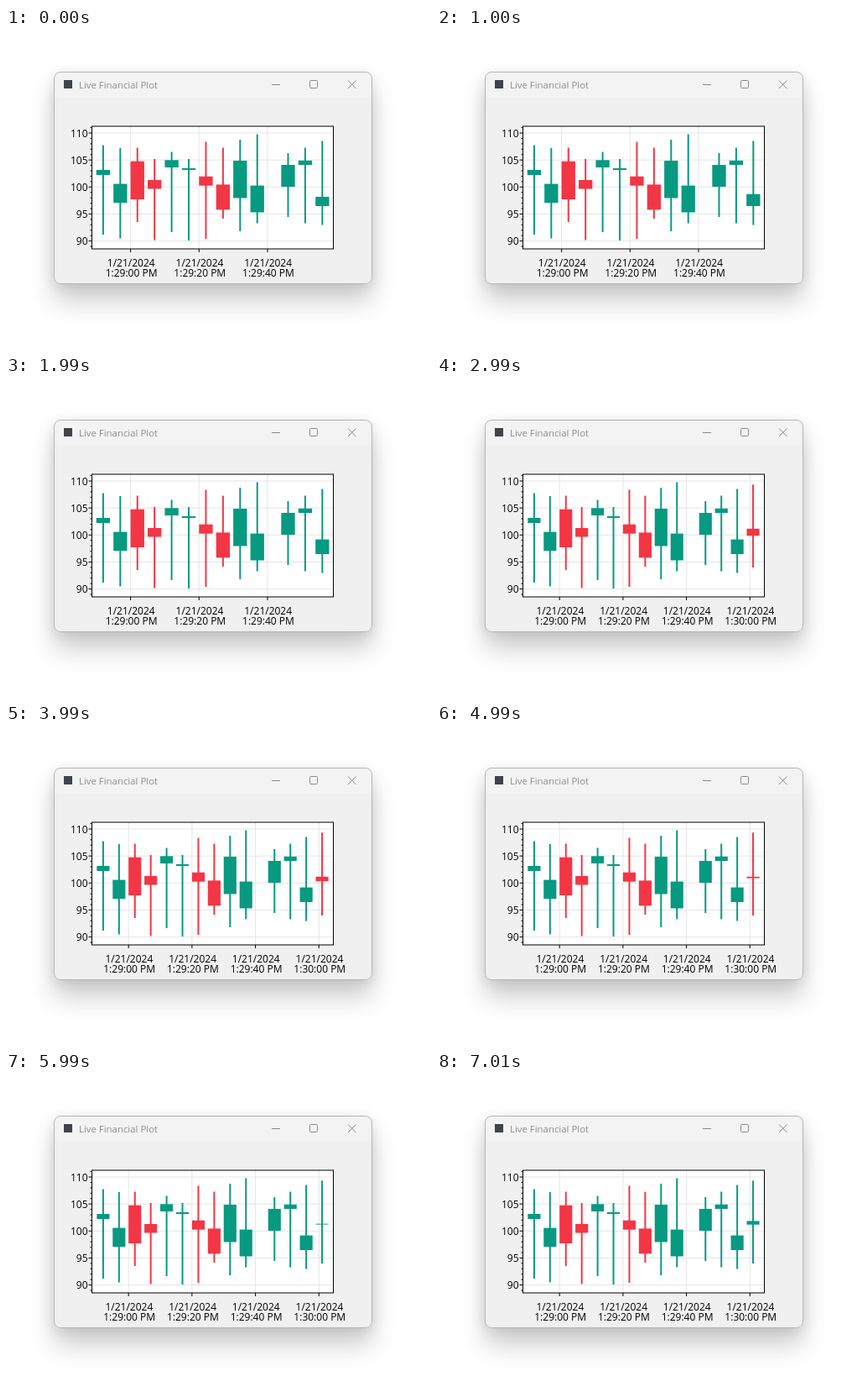
Animation of 507x381 px, one loop 7.99 s. Source, as an HTML page:

```html
<!DOCTYPE html>
<html lang="en">
<head>
<meta charset="utf-8">
<title>Live Financial Plot</title>
<style>
  html, body { margin: 0; width: 100%; height: 100%; overflow: hidden; background: #fff; }
  svg { position: absolute; left: 0; top: 0; font-family: "Open Sans", "Noto Sans", sans-serif; }
  .window {
    position: absolute; left: 57px; top: 52px; width: 378px; height: 251px;
    border: 1px solid #b4b4b4; border-radius: 8px;
    background: linear-gradient(#f3f3f3 30px, #f0f0f0 30px);
    box-shadow: 0 20px 30px rgba(0, 0, 0, .2), 0 2px 16px rgba(0, 0, 0, .09);
  }
</style>
</head>
<body>
<div class="window"></div>
<svg width="507" height="381" viewBox="0 0 507 381">
  <rect x="69" y="62" width="10" height="10" fill="#404347"/>
  <text x="87" y="72" font-size="11.4" fill="#8c8c8c">Live Financial Plot</text>
  <path d="M317 67.5h10M408 62.5l9.5 9.5M417.5 62.5l-9.5 9.5" stroke="#8a8a8a" fill="none"/>
  <rect x="362.5" y="62.5" width="9" height="9" rx="1" stroke="#8a8a8a" fill="none"/>
  <g id="plot"></g>
</svg>
<script>
const LOOP = 7990;
const GREEN = '#089981', RED = '#f23645';
const LEFT = 102.5, RIGHT = 390.5, TOP = 117, BOTTOM = 263;
const FIRST_X = 115.9;
const plot = document.getElementById('plot');

// seconds, wick top, wick bottom, body top, body bottom, colour
const candles = [
  [0, 139.5, 246, 169, 175, GREEN],
  [5, 143, 250.5, 185.6, 208.2, GREEN],
  [10, 142.5, 231, 158.7, 204, RED],
  [15, 156, 252.5, 181, 191.5, RED],
  [20, 147.5, 243, 157.3, 166, GREEN],
  [25, 156, 253, 167, 169, GREEN],
  [30, 135.5, 251, 176.7, 187.7, RED],
  [35, 142.5, 227, 186.4, 216.3, RED],
  [40, 133, 242, 158, 202.5, GREEN],
  [45, 126.5, 232.5, 187.6, 219.5, GREEN],
  [54, 149, 225, 163, 189, GREEN],
  [59, 142.5, 232.5, 157.8, 163, GREEN]
];
const thirteenth = (top) => [64, 134.5, 234.5, top, 212, GREEN];
const newest = (top, bottom, color) => [69, 129.3, 228, top, bottom, color];

// Start time and latest candle of each update
const updates = [
  [0, thirteenth(201)],
  [1000, thirteenth(197.7)],
  [1990, thirteenth(194.6)],
  [2990, newest(181.8, 190.2, RED)],
  [3990, newest(181.8, 187.2, RED)],
  [4990, newest(181.8, 183.6, RED)],
  [5990, newest(180.7, 181.6, GREEN)],
  [7010, newest(177.4, 181.7, GREEN)]
];

const rect = (x, y, w, h, fill) =>
  `<rect x="${x}" y="${y}" width="${w}" height="${h}" fill="${fill}"/>`;
const line = (x1, y1, x2, y2, color = '#000', width = 1) =>
  `<path d="M${x1} ${y1}L${x2} ${y2}" stroke="${color}" stroke-width="${width}"/>`;
const label = (x, y, text, anchor) =>
  `<text x="${x}" y="${y}" font-size="12" text-anchor="${anchor}">${text}</text>`;

function drawCandle([seconds, high, low, top, bottom, color], scale) {
  const x = FIRST_X + seconds * scale;
  return line(x, high, x, low, color, 2) +
    rect(x - 2 * scale, top, 4 * scale, bottom - top, color);
}

function draw(latest) {
  const extended = latest[0] === 69;
  const scale = extended ? 3.785 : 4.085;
  const shown = extended ? [...candles, thirteenth(194.6), latest] : [...candles, latest];
  const priceY = price => 125 + (110 - price) * 6.43;
  let grid = '', axes = '';

  for (let price = 89; price <= 111; price++) {
    const y = priceY(price), major = price % 5 === 0;
    axes += line(LEFT - (major ? 4 : 2), y, LEFT, y);
    if (major) {
      grid += line(LEFT, y, RIGHT, y, '#e5e5e5');
      axes += label(97.5, y + 4.6, price, 'end');
    }
  }
  ['1:29:00', '1:29:20', '1:29:40', '1:30:00'].forEach((time, i) => {
    const x = FIRST_X + (8 + 20 * i) * scale;
    if (x > RIGHT) return;
    grid += line(x, TOP, x, BOTTOM, '#e5e5e5');
    axes += line(x, BOTTOM, x, BOTTOM + 4) +
      label(x + .7, 284, '1/21/2024', 'middle') +
      label(x + 1, 296, time + ' PM', 'middle');
  });

  plot.innerHTML = rect(LEFT, TOP, RIGHT - LEFT, BOTTOM - TOP, '#fff') + grid +
    shown.map(candle => drawCandle(candle, scale)).join('') + axes +
    `<rect x="${LEFT}" y="${TOP}" width="${RIGHT - LEFT}" height="${BOTTOM - TOP}" fill="none" stroke="#000"/>`;
}

let current;
function tick() {
  const time = performance.now() % LOOP;
  const update = updates.findLast(([start]) => start <= time);
  if (update !== current) {
    current = update;
    draw(update[1]);
  }
  requestAnimationFrame(tick);
}
tick();
</script>
</body>
</html>
```
